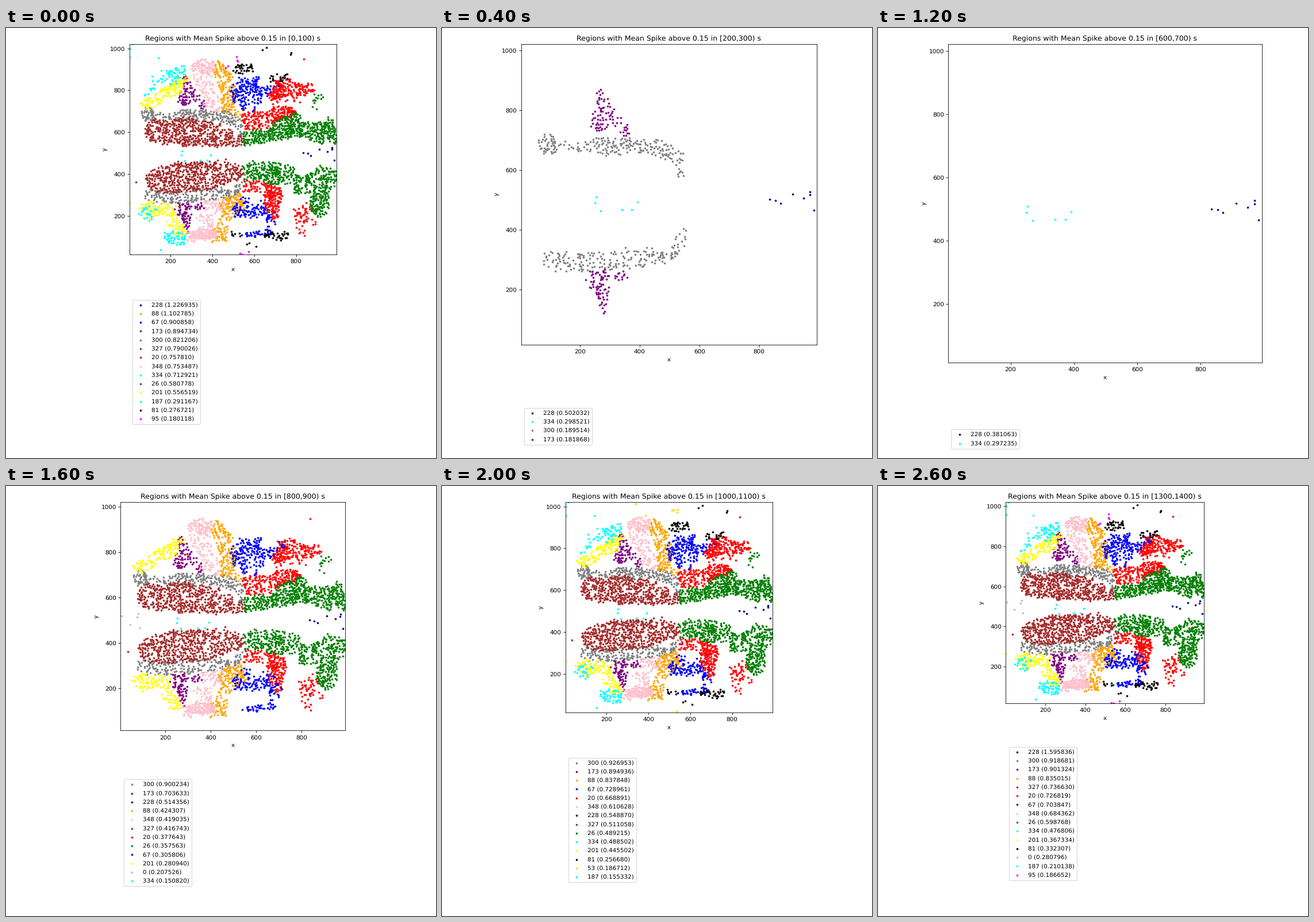
Animation, 748 px wide and 748 px high, one loop 2.8 s. Source, as a matplotlib script:

```python
import numpy as np
import matplotlib.pyplot as plt
from matplotlib.animation import FuncAnimation

SIZE, DPI = 748, 74.8
XLIM, YLIM = (3.1, 993.5), (14.8, 1021.5)
GAP = 4.5
rng = np.random.default_rng(12)
plt.rcParams["text.hinting"] = "none"


def spaced(points, count):
    """Keep the first `count` points that do not crowd each other."""
    kept = np.empty((0, 2))
    for p in points:
        if len(kept) < count and np.all(np.hypot(*(kept - p).T) > GAP):
            kept = np.vstack([kept, p])
    return kept


def stroke(count, *spine):
    """Evenly scattered points along a path of (x, y, half width) knots."""
    knots = np.array(spine, float)
    steps = np.diff(knots[:, :2], axis=0)
    lengths = np.hypot(*steps.T)
    at = np.append(0, np.cumsum(lengths))
    n = count * 8
    t = rng.uniform(0, at[-1], n)
    x, y, half = (np.interp(t, at, col) for col in knots.T)
    seg = np.searchsorted(at, t, side="right") - 1
    across = rng.uniform(-half, half) / lengths[seg]
    pts = np.column_stack([x - across * steps[seg, 1], y + across * steps[seg, 0]])
    pts += rng.normal(0, 3, (n, 2))
    wide_enough = rng.uniform(0, knots[:, 2].max(), n) < half
    return spaced(pts[wide_enough], count)


def dots(*points):
    return np.array(points, float)


regions = {}


def region(key, color, *parts):
    regions[key] = color, np.vstack(parts)


region(228, "darkblue",
       dots((835, 501), (855, 498), (871, 489), (912, 519),
            (949, 506), (971, 527), (970, 517), (983, 465)))
region(334, "cyan",
       dots((250, 490), (254, 509), (269, 464), (341, 467), (374, 467), (392, 491)))
region(0, "silver", dots((7, 521), (82, 529), (76, 516), (46, 483), (89, 468)))
region(95, "magenta",
       stroke(3, (517, 936, 1), (517, 962, 1)),
       stroke(2, (461, 909, 1), (472, 914, 1)),
       stroke(5, (515, 22, 10), (572, 24, 14)))
region(53, "gold",
       stroke(4, (515, 975, 15), (549, 992, 5)),
       dots((339, 1012), (385, 957), (535, 22)))

region(173, "purple",
       stroke(58, (262, 735, 25), (270, 780, 36), (275, 830, 22), (264, 868, 8)),
       stroke(24, (305, 795, 15), (335, 745, 20), (365, 715, 14)),
       stroke(66, (255, 262, 42), (264, 225, 36), (278, 172, 14), (272, 105, 5)),
       stroke(12, (315, 232, 14), (352, 255, 20)))
region(300, "gray",
       stroke(42, (60, 680, 14), (80, 688, 34), (126, 688, 32)),
       stroke(14, (126, 675, 18), (210, 678, 15)),
       stroke(138, (205, 680, 12), (250, 680, 28), (330, 682, 30), (430, 682, 22),
              (515, 655, 32)),
       stroke(18, (525, 660, 14), (540, 570, 8)),
       stroke(160, (78, 308, 30), (130, 293, 30), (240, 293, 32), (400, 306, 32),
              (495, 310, 20)),
       stroke(26, (500, 305, 12), (530, 350, 18), (550, 405, 10)))
region(327, "brown",
       stroke(290, (75, 607, 25), (110, 607, 55), (215, 602, 60), (270, 604, 72),
              (340, 592, 52)),
       stroke(165, (335, 600, 60), (400, 590, 60), (490, 567, 36), (545, 552, 20)),
       stroke(480, (78, 355, 15), (111, 365, 50), (161, 377, 65), (230, 384, 72),
              (349, 390, 70), (449, 411, 58), (545, 405, 22)),
       dots((35, 362)))
region(20, "red",
       stroke(90, (543, 650, 36), (600, 660, 46), (670, 660, 38)),
       stroke(105, (670, 660, 28), (710, 690, 36), (796, 702, 18)),
       stroke(8, (690, 730, 15), (820, 750, 18)),
       stroke(75, (672, 770, 18), (710, 790, 34), (748, 800, 30)),
       stroke(28, (700, 835, 14), (770, 848, 20)),
       stroke(72, (760, 805, 38), (830, 800, 34), (880, 812, 20)),
       stroke(64, (544, 338, 24), (600, 345, 30), (700, 335, 24)),
       stroke(125, (695, 342, 28), (692, 290, 44), (682, 250, 38), (700, 190, 16)),
       stroke(54, (825, 255, 48), (850, 205, 58), (840, 150, 48), (815, 108, 15)),
       dots((838, 949)))
region(26, "green",
       stroke(90, (545, 572, 34), (677, 583, 24)),
       stroke(190, (670, 583, 22), (718, 608, 48), (773, 635, 52), (820, 640, 60)),
       stroke(180, (820, 608, 40), (870, 607, 45), (940, 595, 50), (990, 612, 72)),
       stroke(13, (885, 695, 20), (915, 785, 30)),
       stroke(195, (545, 412, 40), (622, 418, 42), (704, 402, 55), (790, 400, 36)),
       stroke(180, (790, 358, 42), (870, 350, 48), (925, 372, 66), (992, 400, 32)),
       stroke(100, (912, 310, 42), (912, 230, 46), (900, 195, 15)))
region(67, "blue",
       stroke(150, (503, 830, 35), (540, 805, 70), (590, 785, 92), (640, 785, 25)),
       stroke(24, (635, 780, 20), (720, 840, 20)),
       stroke(84, (500, 205, 15), (545, 235, 52), (600, 245, 52), (640, 205, 18)),
       stroke(34, (652, 265, 20), (690, 190, 28), (655, 150, 15)),
       stroke(34, (540, 112, 10), (690, 122, 15)))
region(88, "orange",
       stroke(150, (420, 940, 26), (440, 880, 32), (470, 830, 38), (475, 760, 36),
              (470, 690, 24)),
       stroke(9, (495, 690, 18), (548, 695, 18)),
       stroke(104, (440, 232, 32), (490, 252, 48), (545, 270, 40)),
       stroke(24, (460, 205, 38), (450, 130, 30)),
       stroke(40, (400, 105, 30), (465, 100, 26)))
region(348, "pink",
       stroke(72, (295, 912, 16), (360, 920, 36), (405, 915, 22)),
       stroke(42, (340, 885, 55), (375, 800, 28)),
       stroke(42, (370, 800, 28), (395, 745, 44), (410, 700, 28)),
       stroke(38, (355, 242, 28), (460, 252, 30)),
       stroke(32, (362, 215, 38), (368, 140, 38)),
       stroke(98, (302, 112, 14), (362, 113, 26), (420, 112, 14)),
       stroke(14, (290, 130, 22), (300, 70, 18)))
region(201, "yellow",
       stroke(38, (58, 740, 12), (95, 740, 32), (150, 768, 25)),
       stroke(70, (150, 785, 20), (220, 805, 32), (265, 865, 20)),
       stroke(78, (58, 250, 15), (95, 228, 42), (160, 232, 30), (220, 225, 25)),
       stroke(44, (190, 190, 25), (245, 130, 30), (270, 115, 12)),
       dots((3, 263)))
region(187, "cyan",
       stroke(34, (178, 880, 20), (270, 895, 32)),
       stroke(18, (145, 870, 30), (250, 835, 25)),
       stroke(12, (80, 770, 15), (135, 860, 25)),
       stroke(22, (60, 235, 25), (115, 200, 45)),
       stroke(46, (170, 105, 25), (225, 95, 40), (270, 85, 20)),
       dots((5, 1000), (4, 957), (17, 1021), (140, 954), (152, 36)))
region(81, "black",
       stroke(32, (495, 900, 22), (590, 905, 16)),
       stroke(17, (672, 855, 18), (756, 860, 20)),
       stroke(7, (490, 112, 12), (530, 112, 8)),
       stroke(14, (645, 112, 16), (695, 112, 22)),
       stroke(18, (702, 105, 20), (762, 100, 20)),
       stroke(3, (560, 72, 4), (625, 47, 4)),
       dots((638, 993), (659, 1006), (776, 979), (773, 971)))

# Mean spike per region, keyed by the 100 s window it was measured in.
means = {
    0: {228: 1.226935, 88: 1.102785, 67: .900858, 173: .894734, 300: .821206,
        327: .790026, 20: .757810, 348: .753487, 334: .712921, 26: .580778,
        201: .556519, 187: .291167, 81: .276721, 95: .180118},
    2: {228: .502032, 334: .298521, 300: .189514, 173: .181868},
    4: {334: .298211, 173: .230091, 300: .218468, 327: .198978, 20: .151691},
    6: {228: .381063, 334: .297235},
    8: {300: .900234, 173: .703633, 228: .514356, 88: .424307, 348: .419035,
        327: .416743, 20: .377643, 26: .357563, 67: .305806, 201: .280940,
        0: .207526, 334: .150820},
    10: {300: .926953, 173: .894936, 88: .837848, 67: .728961, 20: .668891,
         348: .610628, 228: .548870, 327: .511058, 26: .489215, 334: .488502,
         201: .445502, 81: .256680, 53: .186712, 187: .155332},
    13: {228: 1.595836, 300: .918681, 173: .901324, 88: .835015, 327: .736630,
         20: .726819, 67: .703847, 348: .684362, 26: .598768, 334: .476806,
         201: .367334, 81: .332307, 0: .280796, 187: .210138, 95: .186652},
}


def blend(a, b, keys):
    """Average two windows over the given regions, strongest first."""
    mixed = {k: np.mean([means[w][k] for w in (a, b) if k in means[w]]) for k in keys}
    return dict(sorted(mixed.items(), key=lambda item: -item[1]))


means[1] = blend(0, 13, means[13])
means[3] = blend(2, 4, means[4].keys() - {20})
means[5] = blend(4, 6, means[2])
means[7] = blend(6, 8, means[8].keys() - {0})
means[9] = blend(8, 10, means[8].keys() - {0})
means[11] = blend(10, 13, means[13])
means[12] = blend(10, 13, means[13].keys() - {95})

fig = plt.figure(figsize=(10, 10), dpi=DPI)
ax = fig.add_axes([0, 0, 1, 1])


def place_axes(rows):
    """The plot shrinks as the legend below it gets more rows."""
    w = 576.2 - 15.42 * rows
    h = w * (YLIM[1] - YLIM[0]) / (XLIM[1] - XLIM[0])
    left, top = 394.9 - w / 2, 27.9
    ax.set_position([left / SIZE, 1 - (top + h) / SIZE, w / SIZE, h / SIZE])


def draw(i):
    ax.clear()
    place_axes(len(means[i]))
    for key, mean in means[i].items():
        color, pts = regions[key]
        ax.scatter(*pts.T, s=6, color=color, label=f"{key} ({mean:.6f})")
    ax.set(xlim=XLIM, ylim=YLIM, xlabel="x", ylabel="y",
           xticks=range(200, 801, 200), yticks=range(200, 1001, 200),
           title=f"Regions with Mean Spike above 0.15 in [{100 * i},{100 * i + 100}) s")
    ax.legend(loc="upper left", bbox_to_anchor=(0, -0.2), labelspacing=0.54)


anim = FuncAnimation(fig, draw, frames=len(means), interval=200, repeat=True)
plt.show()
```
